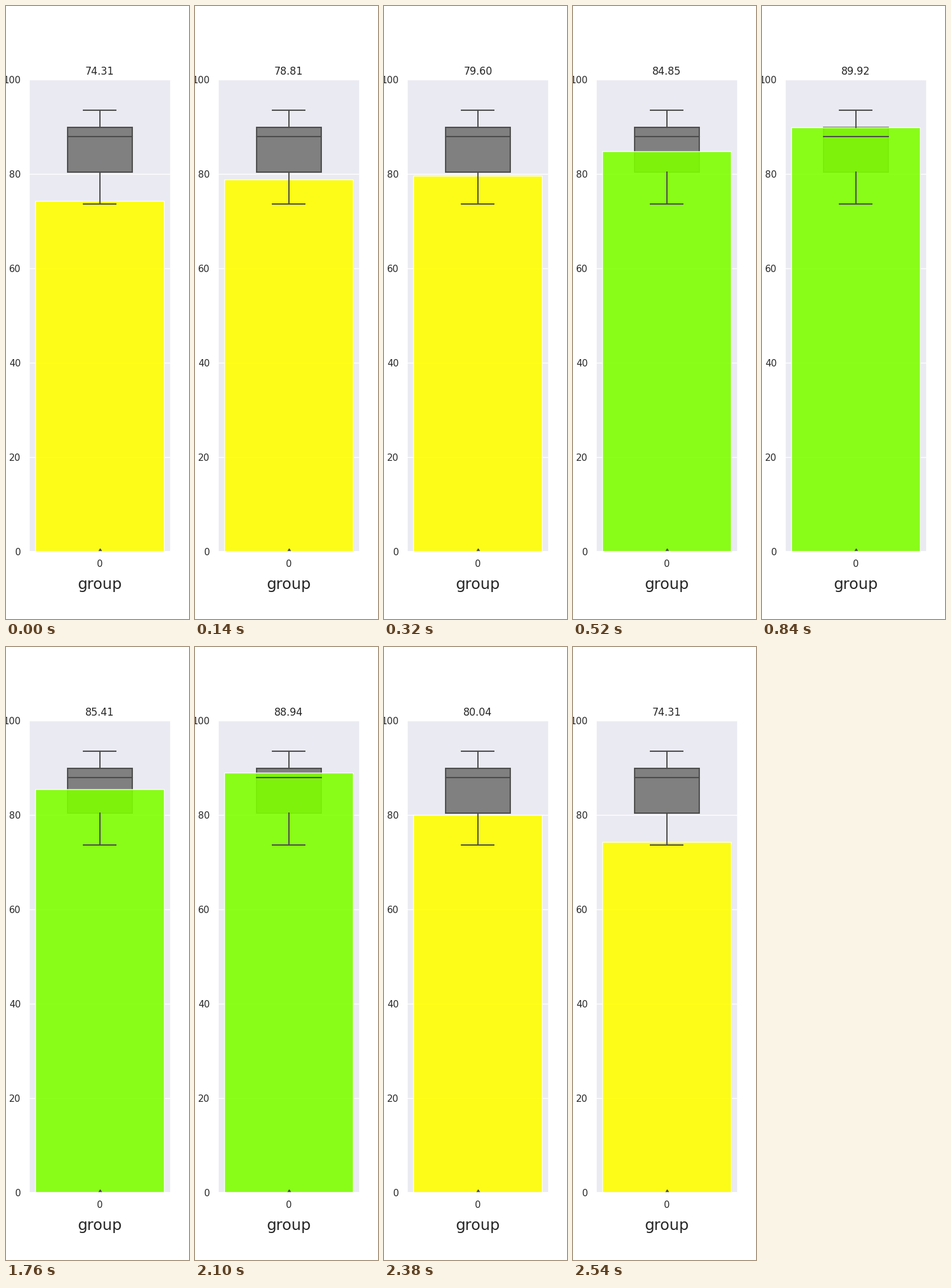
These frames come from a looping animation (300x1000 px, 2.56 s). A matplotlib script:

```python
import numpy as np
import matplotlib.pyplot as plt
from matplotlib.animation import FuncAnimation

INK = "#262626"
LINE = "#4c4c4c"
LOW, Q1, MEDIAN, Q3, HIGH = 73.62, 80.38, 87.95, 89.92, 93.53
FRAMES, INTERVAL = 128, 20

plt.rcParams.update({
    "font.family": "DejaVu Sans",
    "text.color": INK,
    "axes.labelcolor": INK,
    "axes.facecolor": "#eaeaf2",
    "axes.edgecolor": "white",
    "axes.linewidth": 1.25,
    "axes.axisbelow": True,
})

# Score per epoch, joined by straight lines between turning points
TURNS = [0, 3, 6, 8, 10, 14, 17, 22, 26, 29, 31]
SCORES = [74.31, 78.81, 82.50, 79.60, 88.94, 84.85, 82.40, 89.92, 88.30, 91.17, 90.60]
values = np.interp(np.arange(32), TURNS, SCORES)

fig = plt.figure(figsize=(3, 10), dpi=100, facecolor="white")
ax = fig.add_axes([0.125, 0.11, 0.775, 0.77])
ax.set(xlim=(-0.55, 0.55), ylim=(0, 100), xticks=[0], yticks=range(0, 101, 20))
ax.tick_params(length=6, pad=3.5, labelsize=11, labelcolor=INK, bottom=False, left=False)
ax.grid(axis="y", color="white", linewidth=1)
ax.set_xlabel("group", fontsize=18, labelpad=10)
title = ax.set_title("", fontsize=12)


def stroke(xs, ys):
    ax.plot(xs, ys, color=LINE, linewidth=1.5, zorder=2)


ax.add_patch(plt.Rectangle((-0.25, Q1), 0.5, Q3 - Q1, facecolor="#808080",
                           edgecolor=LINE, linewidth=1.5, zorder=1))
for start, end in ((Q1, LOW), (Q3, HIGH)):
    stroke([0, 0], [start, end])
    stroke([-0.125, 0.125], [end, end])
stroke([-0.25, 0.25], [MEDIAN, MEDIAN])
ax.plot([0], [0], "d", color=LINE, markersize=5, zorder=2)

bar = ax.add_patch(plt.Rectangle((-0.5, 0), 1, 0, edgecolor="white",
                                 linewidth=1, alpha=0.9, zorder=1.1))


def epoch_at(frame):
    """Run forward then back; the third of every four epochs is held."""
    tick = min(frame, FRAMES - 1 - frame)
    group, step = divmod(tick, 8)
    return 4 * group + (step if step < 2 else 2 if step < 7 else 3)


def update(frame):
    value = values[epoch_at(frame)]
    bar.set_height(value)
    bar.set_facecolor("#7fff00" if value >= Q1 else "#ffff00")
    title.set_text(f"{value:.2f}")
    return bar, title


anim = FuncAnimation(fig, update, frames=FRAMES, interval=INTERVAL,
                     repeat=True, repeat_delay=0, blit=False)
plt.show()
```
